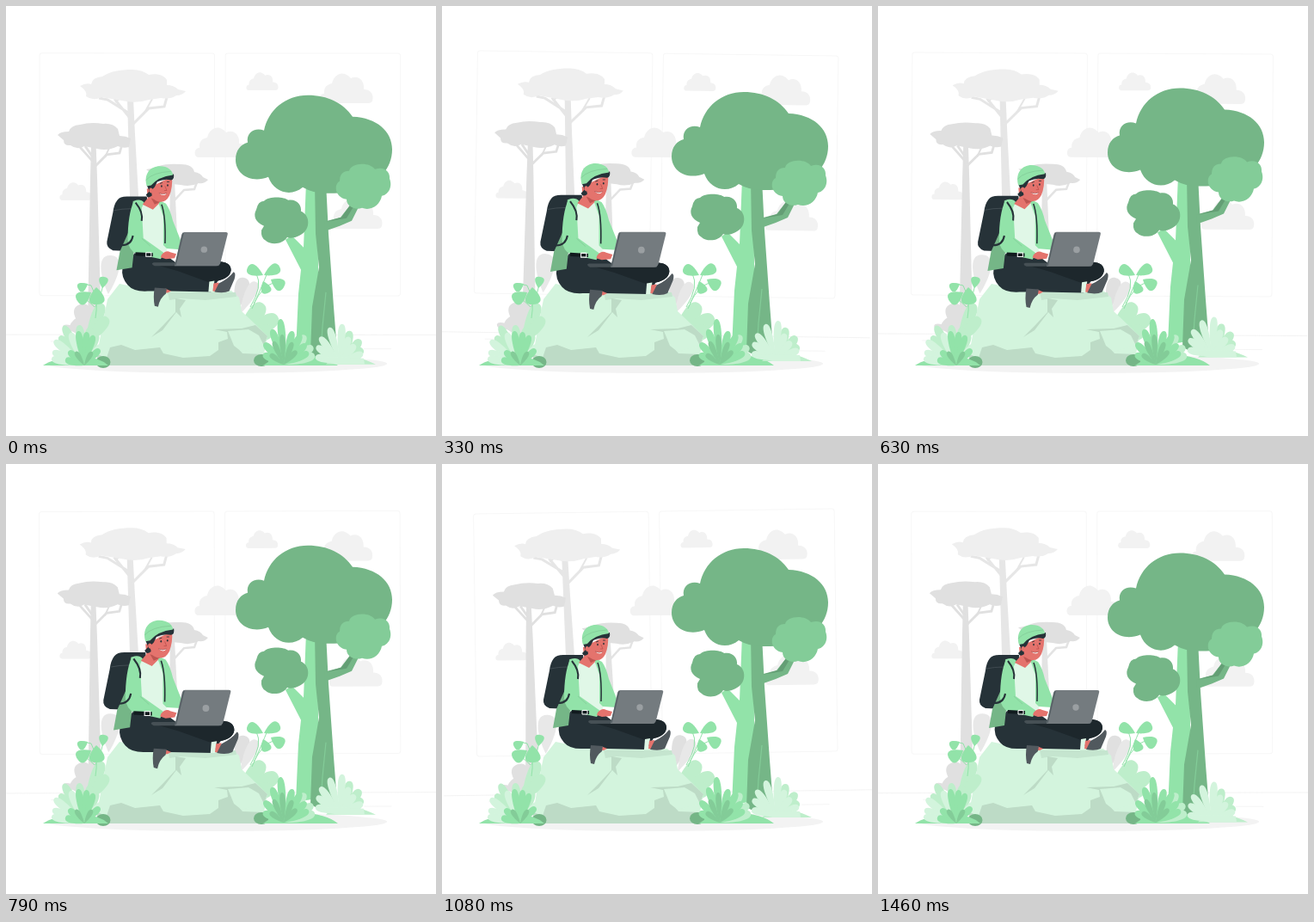
Recreate the animation shown at these times as an HTML page with a canvas. Size 500 px wide and 500 px high, loop 1.5 s.

```html
<!DOCTYPE html>
<html lang="en">
<head>
<meta charset="utf-8">
<title>Working outdoors</title>
<style>
  html, body { margin: 0; width: 100%; height: 100%; overflow: hidden; background: #fff; }
  canvas { display: block; width: 100vw; height: 100vh; }
</style>
</head>
<body>
<canvas id="stage"></canvas>
<script>
const canvas = document.getElementById('stage');
const ctx = canvas.getContext('2d');

const GREEN = '#92e3a9', DEEP = '#75b687', MID = '#83cc98', SOFT = '#beeecb', PALE = '#d3f4dd';
const INK = '#263238', SKIN = '#e4736d', GREY = '#e0e0e0', MIST = '#ebebeb';

function fill(d, color) {
  ctx.fillStyle = color;
  ctx.fill(new Path2D(d));
}

function line(d, color, width = 1) {
  ctx.strokeStyle = color;
  ctx.lineWidth = width;
  ctx.stroke(new Path2D(d));
}

function oval(x, y, rx, ry, color, angle = 0) {
  ctx.fillStyle = color;
  ctx.beginPath();
  ctx.ellipse(x, y, rx, ry, angle, 0, Math.PI * 2);
  ctx.fill();
}

// Leaf growing from (x, y) to its rounded tip; w is the full width.
function leaf(x, y, tipX, tipY, w, color) {
  ctx.save();
  ctx.translate(x, y);
  ctx.rotate(Math.atan2(tipY - y, tipX - x));
  const n = Math.hypot(tipX - x, tipY - y);
  fill(`M0 0C${n * .4} ${-w * .55} ${n} ${-w} ${n} 0C${n} ${w} ${n * .4} ${w * .55} 0 0Z`, color);
  ctx.restore();
}

function fan(x, y, w, color, tips) {
  for (const [tx, ty] of tips) leaf(x, y, tx, ty, w, color);
}

// Unit cloud is 62 by 35, placed by its lower left corner.
function cloud(x, base, scale) {
  ctx.save();
  ctx.translate(x, base);
  ctx.scale(scale, scale);
  fill('M5 0C-1 0 -1 -11 6 -11C5 -19 10 -22 15 -23C17 -32 24 -36 30 -34Q35 -32 37 -29C45 -33 53 -27 52 -16C60 -16 64 -10 62 -3Q61 0 57 0Z', '#f2f2f2');
  ctx.restore();
}

function panel(x) {
  ctx.strokeStyle = '#f7f7f7';
  ctx.lineWidth = 1;
  ctx.beginPath();
  ctx.roundRect(x, 55, 203.5, 282, 3);
  ctx.stroke();
}

function drawBackdrop() {
  panel(39);
  panel(255);
  line('M0 382.3H500', MIST, .6);
  line('M416 398.5H448M392 401H405M52 390H84', MIST, .5);

  cloud(279, 98, .6);
  cloud(364, 113, 1);
  cloud(219, 176, 1);
  cloud(62, 226, .6);
  cloud(375, 259, 1);

  fill('M141 109H148L150 150L154 220L160 380H147L144 220Z', '#e6e6e6');
  line('M147 138L166 119L184 117L187 106M143 129L126 108M142 124L118 109L108 107', '#e6e6e6', 3);
  line('M161 124L170 108M127 112L134 106', '#e6e6e6', 2);
  fill('M86 93Q93 89 99 91Q100 83 112 82C121 76 132 74 147 74Q158 74 166 80C176 78 184 81 187 86L187 92Q195 92 200 97L209 99Q205 104 198 104Q191 109 180 107L166 109Q151 114 135 110L111 106Q101 111 93 105Q95 99 86 93Z', '#efefef');

  fill('M191 203H196L199 265H190Z', '#e3e3e3');
  line('M195 227L207 214L219 213L222 205M193 219L185 206', '#e3e3e3', 2.5);
  fill('M163 190Q172 189 178 186Q187 183 203 184Q217 184 219 193Q226 194 229 199L235 202Q231 207 224 206Q214 211 203 208L183 206Z', GREY);

  fill('M99 160H104.5L106 200L111 375H95L98 200Z', GREY);
  line('M104 186L117 173L132 171L135 161M101 181L84 162M101 176L92 163', GREY, 2.8);
  line('M115 176L121 163', GREY, 2);
  fill('M60 150Q63 146 73 146Q75 139 86 138Q98 135 113 137Q124 136 130 143L132 151Q139 151 145 154L143 164Q136 166 130 163Q118 169 106 166L91 163Q83 168 75 162Q67 163 67 156Z', GREY);

  leaf(99, 385, 86, 347, 17, GREY);
  leaf(96, 385, 78, 366, 15, GREY);
  leaf(92, 378, 66, 373, 6, GREY);
  leaf(119, 335, 122, 290, 18, '#e8e8e8');
  leaf(268, 355, 277, 316, 14, GREY);
  leaf(272, 358, 291, 321, 11, '#e8e8e8');
}

function drawTree() {
  fill('M349 205H362L364 398L337 402L340 335L343 307L325 272L332 267L346 281Z', GREEN);
  fill('M359 205H372L375 265L381 350L385 402L367 412L354 405L356 350L364 304L360 265Z', DEEP);
  line('M372 333L368 373L366 405', MID, 1.2);
  fill('M370 251L389 246L400 232H411L402 250L388 256L371 262Z', DEEP);
  fill('M390 246L400 232H405L396 247L372 251Z', '#649e75');

  fill('M300 145C305 121 325 104 351 104C374 104 392 113 403 129C431 130 449 146 449 167C449 189 433 206 412 211C397 218 385 218 372 218Q357 218 345 211C332 222 312 218 305 199C285 207 267 196 267 179C267 168 273 161 281 159C279 147 290 141 300 145Z', DEEP);
  fill('M399 192C401 182 423 181 429 190C440 186 447 193 446 201C450 211 444 220 437 221C435 232 424 239 414 235C405 238 396 233 396 225C382 223 381 207 388 204Q388 192 399 192Z', MID);
  fill('M300 227C306 221 324 222 328 226C338 224 344 232 343 239C353 243 354 257 346 264C338 270 331 271 327 269C322 278 307 278 302 273Q296 270 297 261L300 256C290 252 287 244 291 237Q293 227 300 227Z', DEEP);
}

function drawTreeGrass() {
  fill('M372 417Q383 404 400 406Q420 412 430 417Z', SOFT);
  fan(392, 416, 9, SOFT, [[400, 378], [412, 388], [415, 399]]);
  fan(388, 415, 7.5, PALE, [[376, 374], [391, 370], [365, 385], [361, 396], [360, 408], [399, 385], [406, 394], [415, 404]]);
  fill('M359 410Q380 408 416 410L417 417H384Z', PALE);
}

function drawRock() {
  fan(266, 392, 16, SOFT, [[299, 346], [316, 361], [310, 376]]);
  line('M286 352Q298 325 304 310M288 346Q299 325 311 322M284 350Q299 326 291 311', GREEN, 1);
  leaf(299, 313, 281, 304, 11, GREEN);
  leaf(300, 313, 318, 303, 11, GREEN);
  leaf(308, 318, 323, 327, 12, GREEN);
  leaf(299, 320, 304, 334, 10, GREEN);

  fill('M132 323L152 327L262 331L271 339L274 355L291 371L304 384L300 405L292 418H115L106 405L113 366L118 341Z', PALE);
  fill('M188 333H267L268 338L232 342L203 340L190 342Z', '#c5e5cf');
  fill('M197 340L209 342L202 352L204 362L198 356L182 377L169 385L183 371L197 356Z', '#bddbc6');
  fill('M106 405L117 409L121 397L134 394L150 400L179 397L183 404L206 409L237 407L247 400L247 391L258 387L257 379L242 376L274 375L290 371L304 384L300 394L280 390L268 396L275 404L301 405L292 418H106Z', '#bddbc6');
  fill('M258 378L282 376L294 383L300 395L274 402L265 395Z', PALE);
  oval(113, 414, 8.5, 7, DEEP);
  oval(297, 412, 9, 7, DEEP);
}

function drawLeftGrass() {
  fan(92, 395, 12, SOFT, [[112, 346], [118, 362]]);
  line('M104 363Q108 342 99 325L90 323M104 350Q111 337 114 320M103 350L92 340', GREEN, 1);
  leaf(99, 333, 83, 343, 13, GREEN);
  leaf(105, 327, 106, 347, 15, GREEN);
  leaf(112, 328, 114, 315, 9, GREEN);
  leaf(95, 323, 84, 329, 9, GREEN);

  fill('M43 418Q55 409 88 408Q108 408 119 418Z', GREEN);
  fan(91, 417, 8.5, SOFT, [[67, 372], [62, 384], [85, 371], [98, 373], [106, 381]]);
  fan(90, 417, 8, PALE, [[56, 389], [54, 402], [75, 380], [53, 410], [113, 394]]);
  fan(90, 418, 7, GREEN, [[84, 378], [94, 379], [102, 383], [73, 401], [69, 411], [109, 399]]);
  fan(91, 418, 5, MID, [[81, 402], [100, 402]]);
}

function drawRightGrass() {
  fill('M299 418Q317 403 341 405Q373 407 386 418Z', GREEN);
  fan(324, 417, 9, SOFT, [[348, 383], [357, 396], [359, 406]]);
  fan(324, 417, 7.5, GREEN, [[319, 364], [309, 376], [300, 392], [333, 378], [343, 382], [349, 393], [352, 403], [299, 405]]);
  fan(323, 417, 5.5, MID, [[321, 382], [311, 390], [333, 391], [338, 401], [307, 405]]);
}

function drawHead() {
  fill('M164 213L174 212L178 230L171 237L159 231L165 224Z', SKIN);
  fill('M169 224L180 228L173 231Z', '#bd5551');
  fill('M168 211L193 199Q194 211 190 221Q186 229 179 228Q168 227 168 211Z', SKIN);
  fill('M164 209Q170 202 180 198L195 196Q196 202 192 203Q184 201 176 205L173 211L169 215L170 221Q165 225 163 220L167 216Z', INK);
  oval(169, 215, 2.2, 3, SKIN, -.2);
  fill('M164 210C160 196 168 187 179 187C188 187 194 192 194 197Q177 199 169 209Z', GREEN);
  line('M163 203Q171 194 192 193', MID, .8);
  oval(181, 210, .8, 1.2, INK);
  oval(188, 209, .8, 1.2, INK);
  line('M179 207L182 206M187 205L190 205', INK, .8);
  line('M185 210L187 215L184 215', '#b84b48', .7);
  fill('M178 218Q183 220 187 218Q184 223 178 218Z', '#fff');
  line('M178 218Q183 220.5 187 218', '#8f3937', .6);
}

function drawPerson() {
  fill('M130 226Q133 222 141 222L164 222L166 240L150 285L125 284Q117 281 118 274L125 240Q126 231 130 226Z', INK);
  line('M126 238Q135 236 146 236', '#465157', .8);

  fill('M151 286L184 288L200 300L249 297Q261 298 261 307Q260 316 246 319L238 332L190 331L165 331Q149 332 142 324Q134 315 136 304Z', INK);
  fill('M172 300L249 297Q261 298 261 307Q260 316 246 319L236 321L200 308Z', '#1d272c');

  fill('M157 231L179 230L186 246L187 285L166 290L151 287Z', '#e0f7e7');
  fill('M148 227L158 228L157 260L149 286L147 304L129 307L133 285L145 258Z', DEEP);
  fill('M176 225L186 230Q191 237 194 250L204 275L203 283L187 282L183 278L183 245Z', GREEN);
  line('M181 231Q186 245 185 276', INK, 1.5);
  fill('M149 227Q157 224 161 229L158 235L160 270L184 287L180 294L152 288Q143 284 142 272Q142 243 149 227Z', GREEN);
  line('M151 229Q160 240 158 250', INK, 2);
  line('M133 278Q146 279 148 267', INK, 2);
  line('M158 270L168 279', MID, .8);
  fill('M151 286L171 287V291L151 290Z', '#111a1e');
  line('M163 286.5H169V291H163Z', '#fff', 1);
  drawHead();

  fill('M181 289Q186 283 191 286L198 288L196 293L186 294L180 292Z', SKIN);

  fill('M172 298H248L247 302H173Q170 301 170 299Z', '#465055');
  fill('M207 263H255Q258 263 257 266L249 298Q248 302 244 302H196L204 266Q205 263 207 263Z', '#747b7f');
  line('M206 264L197 301', '#566065', 1.5);
  oval(230, 283, 3.7, 3.7, '#9a9fa2');

  fill('M236 320L242 319L240 332L235 332Z', '#dff7e6');
  fill('M241 322L247 321L246 332L240 331Z', SKIN);
  fill('M247 322Q258 317 264 309Q267 310 265 317L259 331Q253 334 242 332Z', '#51595e');
  fill('M185 328L192 331L188 333H184Z', SKIN);
  fill('M173 327L187 328L186 334Q179 339 177 349L173 348Q171 338 173 327Z', '#51595e');
}

const LOOP = 1500, FRAME = LOOP / 36, LEAD = 13;

// Linear interpolation through [position, value] stops.
function track(p, stops) {
  const i = stops.findIndex(([at]) => at >= p);
  if (i <= 0) return stops[0][1];
  const [a, va] = stops[i - 1], [b, vb] = stops[i];
  return va + (vb - va) * (p - a) / (b - a);
}

const SWAY = [[0, 0], [.25, 1], [.75, -1], [1, 0]];
const LIFT = [[0, 0], [.5, -10], [1, 0]];
const BEAT = [[0, 1], [.1, 1.1], [.3, 1], [.4, 1], [.5, 1.1], [.6, 1], [1, 1]];

function layer(draw, x, y, { angle = 0, scale = 1, dy = 0 }) {
  ctx.save();
  ctx.translate(x, y + dy);
  ctx.rotate(angle * Math.PI / 180);
  ctx.scale(scale, scale);
  ctx.translate(-x, -y);
  draw();
  ctx.restore();
}

function render(ms) {
  const step = Math.floor(((ms % LOOP) + 1) / FRAME) % 36;
  const p = (step * FRAME + LEAD) / LOOP;
  const lift = { dy: track(p, LIFT) };

  const size = Math.round(innerWidth * devicePixelRatio);
  const tall = Math.round(innerHeight * devicePixelRatio);
  if (canvas.width !== size || canvas.height !== tall) {
    canvas.width = size;
    canvas.height = tall;
  }
  ctx.setTransform(size / 500, 0, 0, tall / 500, 0, 0);
  ctx.fillStyle = '#fff';
  ctx.fillRect(0, 0, 500, 500);

  layer(drawBackdrop, 250, 227, { angle: track(p, SWAY) });
  oval(245, 416, 198, 11, '#f3f3f3');
  layer(drawTree, 0, 0, lift);
  drawRock();
  drawLeftGrass();
  drawRightGrass();
  layer(drawTreeGrass, 0, 0, lift);
  layer(drawPerson, 192, 268, { scale: track(p, BEAT) });
}

const start = performance.now();
function tick() {
  render(performance.now() - start);
  requestAnimationFrame(tick);
}
tick();
</script>
</body>
</html>
```
